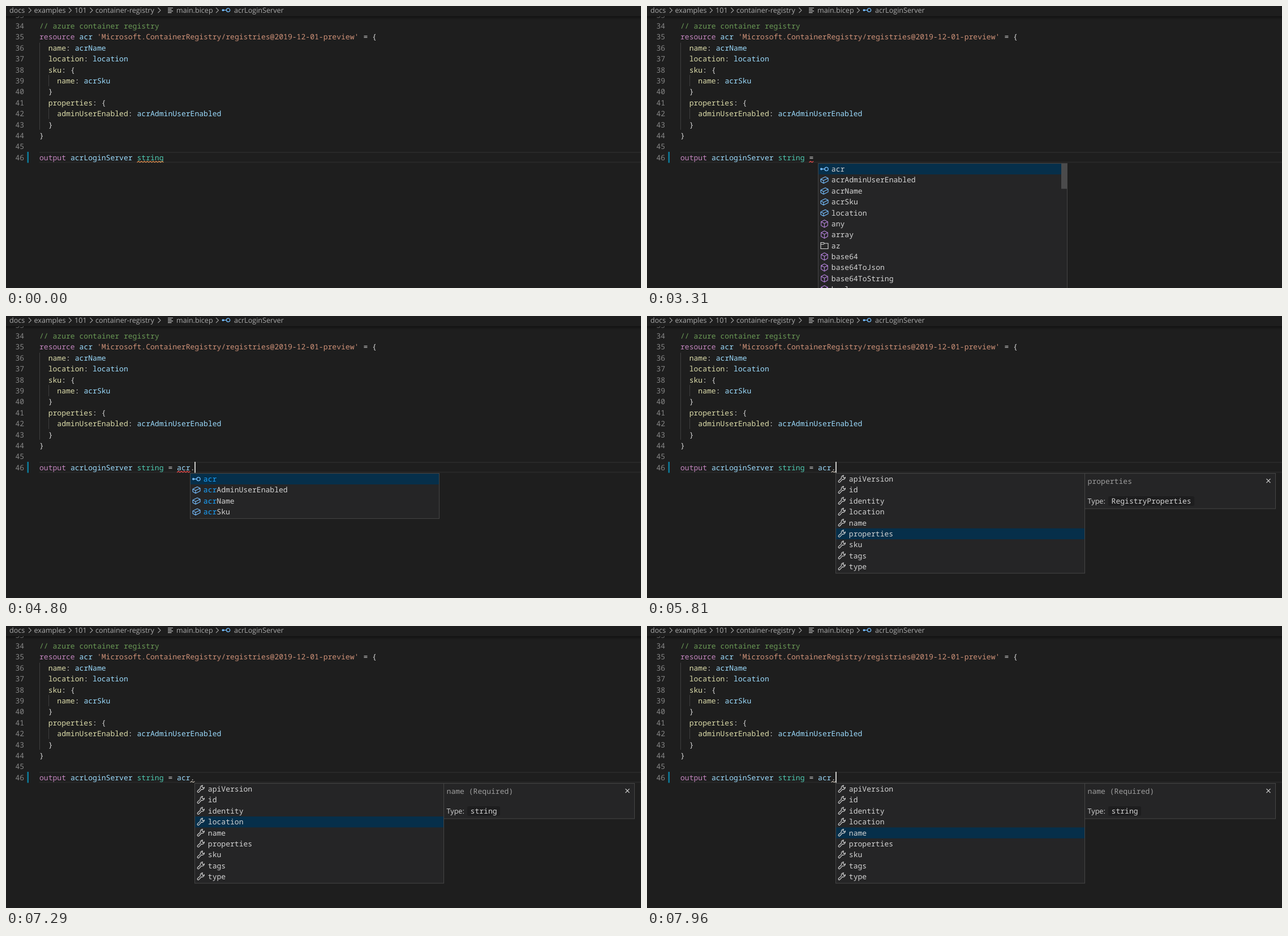
Write an HTML page that moves like this. It is 1122 px wide and 499 px high and loops after 8000 ms.

```html
<!DOCTYPE html>
<html lang="en">
<head>
<meta charset="utf-8">
<title>Editor completion</title>
<style>
html, body { margin: 0; width: 100%; height: 100%; overflow: hidden; background: #1e1e1e; }
svg { display: block; width: 1122px; height: 499px; }
text { white-space: pre; text-rendering: geometricPrecision; }
.code { font: 13.07px "Noto Sans Mono", "DejaVu Sans Mono", monospace; }
.ui { font: 12.58px "Open Sans", "Noto Sans", sans-serif; }
</style>
</head>
<body>
<svg id="stage" viewBox="0 0 1122 499">
  <defs>
    <linearGradient id="shade" x2="0" y2="1">
      <stop stop-color="#000" stop-opacity=".4"/>
      <stop offset="1" stop-color="#000" stop-opacity="0"/>
    </linearGradient>
  </defs>
  <g id="page"></g>
  <g id="live"></g>
</svg>
<script>
const LOOP = 8000, LEFT = 59, CHAR = 7.842, LINE = 19.4, ROW = 19.35;
const C = {
  text: '#d4d4d4', comment: '#6a9955', key: '#c586c0', name: '#9cdcfe', prop: '#dcdcaa',
  str: '#ce9178', type: '#4ec9b0', dim: '#858585', crumb: '#a9a9a9', blue: '#75beff',
  purple: '#b180d7', match: '#18a3ff', red: '#f14c4c', warn: '#e08f50', hint: '#b9b0a4'
};

const colX = col => LEFT + col * CHAR;
const lineY = n => 40 + (n - 34) * LINE;

const rect = (x, y, w, h, fill, more = '') =>
  `<rect x="${x}" y="${y}" width="${w}" height="${h}" fill="${fill}" ${more}/>`;
const stroke = (d, color, width = 1.1, at = '0,0') =>
  `<path d="${d}" fill="none" stroke="${color}" stroke-width="${width}" stroke-linejoin="round" transform="translate(${at})"/>`;
const label = (x, y, str, fill, cls = 'code', anchor = 'start') =>
  `<text class="${cls}" x="${x}" y="${y}" fill="${fill}" text-anchor="${anchor}">${str}</text>`;

// Alternating text and colour name, laid out on the character grid.
function tokens(n, col, ...parts) {
  let out = '';
  for (let i = 0; i < parts.length; i += 2) {
    out += label(colX(col), lineY(n), parts[i], C[parts[i + 1]]);
    col += parts[i].length;
  }
  return out;
}

const shapes = {
  field: ['M-6.5-1.5L1.5-5.5L6.5-3V1.8L-1.5 5.8L-6.5 3ZM-6.5-1.5L-1.5 1L6.5-3M-1.5 1V5.8', C.blue],
  method: ['M0-6.5L5.8-3.5V3.2L0 6.5L-5.8 3.2V-3.5ZM-5.8-3.5L0-.5L5.8-3.5M0-.5V6.5', C.purple],
  folder: ['M-6.5-5.5h5l1.5 1.5h6.5v9.5h-13zM-6.5-2.2h5l1.5-1.8', C.text],
  wrench: ['M6-3.2A4 4 0 0 1 .8.6L-3.8 5.6A1.6 1.6 0 0 1-6 3.3L-1-1.2A4 4 0 0 1 3-6.4L1.6-3.8L3.6-1.8Z', C.text]
};

function icon(kind, x, y) {
  if (kind === 'link') {
    return `<circle cx="${x - 5.5}" cy="${y}" r="1.9" fill="${C.blue}"/>` +
      stroke('M-5.5 0H.5M6.7 0A3.1 3.1 0 1 1 .5 0A3.1 3.1 0 1 1 6.7 0', C.blue, 1.3, `${x},${y}`);
  }
  const [d, color] = shapes[kind];
  return stroke(d, color, 1.15, `${x},${y}`);
}

function drawPage() {
  let out = '';
  for (let n = 33; n <= 46; n++) out += label(32.2, lineY(n), n, C.dim, 'code', 'end');
  out += rect(59, 65, 1, 154, '#404040') + rect(75, 122, 1, 20, '#404040') + rect(75, 181, 1, 19, '#404040');
  out += tokens(34, 0, '// azure container registry', 'comment');
  out += tokens(35, 0, 'resource', 'key', ' acr ', 'name',
    "'Microsoft.ContainerRegistry/registries@2019-12-01-preview'", 'str', ' = {', 'text');
  out += tokens(36, 2, 'name', 'prop', ': ', 'text', 'acrName', 'name');
  out += tokens(37, 2, 'location', 'prop', ': ', 'text', 'location', 'name');
  out += tokens(38, 2, 'sku', 'prop', ': {', 'text');
  out += tokens(39, 4, 'name', 'prop', ': ', 'text', 'acrSku', 'name');
  out += tokens(40, 2, '}', 'text');
  out += tokens(41, 2, 'properties', 'prop', ': {', 'text');
  out += tokens(42, 4, 'adminUserEnabled', 'prop', ': ', 'text', 'acrAdminUserEnabled', 'name');
  out += tokens(43, 2, '}', 'text') + tokens(44, 0, '}', 'text');

  out += rect(59, 258, 1063, 2, '#282828') + rect(59, 275.5, 1063, 2, '#282828');
  out += rect(37.5, 258, 2.5, 19.5, '#0c7d9d');
  out += tokens(46, 0, 'output', 'key', ' acrLoginServer ', 'name', 'string', 'type');

  out += rect(0, 0, 1122, 18, '#1e1e1e') + rect(0, 18, 1122, 6, 'url(#shade)');
  const crumbs = [[6, 'docs'], [49.5, 'examples'], [121, '101'], [158, 'container-registry'],
    [301, 'main.bicep'], [403, 'acrLoginServer']];
  for (const [x, str] of crumbs) out += label(x, 12.4, str, C.crumb, 'ui');
  for (const x of [40, 111, 148.5, 268.5, 371]) out += stroke('M0 3.2l4.5 4.5l-4.5 4.5', C.crumb, 1.1, `${x},0`);
  out += stroke('M286 3.5h9M286 6.2h6.5M286 8.9h9M286 11.6h6.5', '#c5c5c5', 1.2);
  return out + icon('link', 389, 7.3);
}

const group = (kind, names) => names.split(' ').map(name => ({ kind, name }));
const symbols = [
  ...group('link', 'acr'),
  ...group('field', 'acrAdminUserEnabled acrName acrSku location'),
  ...group('method', 'any array'),
  ...group('folder', 'az'),
  ...group('method', 'base64 base64ToJson base64ToString bool')
];
const members = group('wrench', 'apiVersion id identity location name properties sku tags type');
const matching = word => symbols.slice(0, 8).filter(s => s.name.includes(word));

const info = (title, type) => ({ title, type });
const nameInfo = info('name (Required)', 'string');
const placeInfo = info('location (Required)', 'string');
const suggest = (word, col) => ({ items: matching(word), word, col });

// Each step changes part of the state; cursor 0 means hidden.
const steps = [
  [0, { tail: '', word: '', known: false, cursor: 0, wave: [22, 28, 'warn'], list: null, pick: 0, doc: null }],
  [500, { cursor: 29 }],
  [870, { cursor: 0 }],
  [1350, { cursor: 29 }],
  [1420, { wave: [27, 28, 'red'] }],
  [1890, { cursor: 0 }],
  [2290, { tail: '=', cursor: 30 }],
  [2440, { wave: [29, 30, 'red'] }],
  [2760, { cursor: 31 }],
  [2850, { list: { items: symbols, word: '', col: 31, bar: true } }],
  [3310, { cursor: 0 }],
  [3400, { word: 'a', cursor: 32, list: suggest('a', 32) }],
  [3630, { known: true }],
  [3710, { wave: [31, 32, 'red'] }],
  [3870, { word: 'ac', cursor: 33, list: suggest('ac', 33) }],
  [4100, { wave: [31, 33, 'red'] }],
  [4260, { word: 'acr', cursor: 34, list: suggest('acr', 34) }],
  [4490, { wave: [31, 34, 'red'] }],
  [4720, { cursor: 0 }],
  [4800, { word: 'acr.', cursor: 35 }],
  [4880, { list: { items: members, word: '', col: 35 }, pick: 5, wave: [34, 35, 'hint'],
    doc: info('properties', 'RegistryProperties') }],
  [5330, { cursor: 0 }],
  [5810, { cursor: 35 }],
  [6280, { cursor: 0 }],
  [6810, { cursor: 35 }],
  [7120, { pick: 4, doc: nameInfo }],
  [7290, { pick: 3, cursor: 0 }],
  [7370, { doc: placeInfo }],
  [7440, { pick: 2 }],
  [7510, { doc: info('identity', 'IdentityProperties') }],
  [7810, { pick: 3, doc: placeInfo, cursor: 35 }],
  [7960, { pick: 4, doc: nameInfo }]
];
let state = {};
const states = steps.map(([at, change]) => (state = { ...state, ...change, at }));

function squiggle([from, to, color]) {
  const end = colX(to);
  let x = colX(from), d = `M${x} 276.8`, up = true;
  while ((x += 2.6) <= end + 0.5) {
    d += `L${x} ${up ? 274.7 : 276.8}`;
    up = !up;
  }
  return stroke(d, C[color]);
}

function drawList({ items, word, col, bar }, pick) {
  const x = Math.floor(colX(col));
  let out = rect(x + 0.5, 278.5, 440, items.length * ROW + 2.5, '#252526', 'stroke="#454545"');
  out += rect(x + 1, 279, 439, ROW - 0.4 + (pick ? 0.4 : 0), '#062f4a', `transform="translate(0,${pick * ROW})"`);
  items.forEach(({ kind, name }, i) => {
    const y = 288.5 + i * ROW, at = name.indexOf(word), end = at + word.length;
    out += icon(kind, x + 11.5, y);
    const str = name.slice(0, at) + `<tspan fill="${C.match}">${name.slice(at, end)}</tspan>` + name.slice(end);
    out += label(x + 23.8, y + 4.6, str, C.text);
  });
  return bar ? out + rect(x + 430, 279, 10, 44.5, '#4b4b4c') : out;
}

function drawDoc({ title, type }) {
  return rect(773.5, 278.5, 337, 62.5, '#252526', 'stroke="#454545"') +
    label(778.6, 296.6, title, '#9d9d9d') +
    stroke('M1094.5 288.2l7 7M1101.5 288.2l-7 7', C.text, 1.2) +
    label(778.6, 331.8, 'Type:', C.text, 'ui') +
    rect(815, 319, type.length * CHAR + 11, 17, '#1d1d1e', 'rx="3"') +
    label(820.6, 332, type, C.text);
}

function drawLive(s) {
  const dot = s.word.endsWith('.') ? '.' : '';
  const word = dot ? s.word.slice(0, -1) : s.word;
  let out = tokens(46, 29, s.tail, 'text', ' ', 'text', word, s.known ? 'name' : 'text', dot, 'text');
  out += squiggle(s.wave);
  if (s.list) out += drawList(s.list, s.pick);
  if (s.doc) out += drawDoc(s.doc);
  if (s.cursor) out += rect(Math.floor(colX(s.cursor)), 258, 2, 19.5, '#c8c8c6');
  return out;
}

const live = document.getElementById('live');
document.getElementById('page').innerHTML = drawPage();
let shown = null;

function tick() {
  const t = performance.now() % LOOP;
  const now = states.findLast(s => s.at <= t);
  if (now !== shown) {
    shown = now;
    live.innerHTML = drawLive(now);
  }
  requestAnimationFrame(tick);
}
tick();
</script>
</body>
</html>
```
